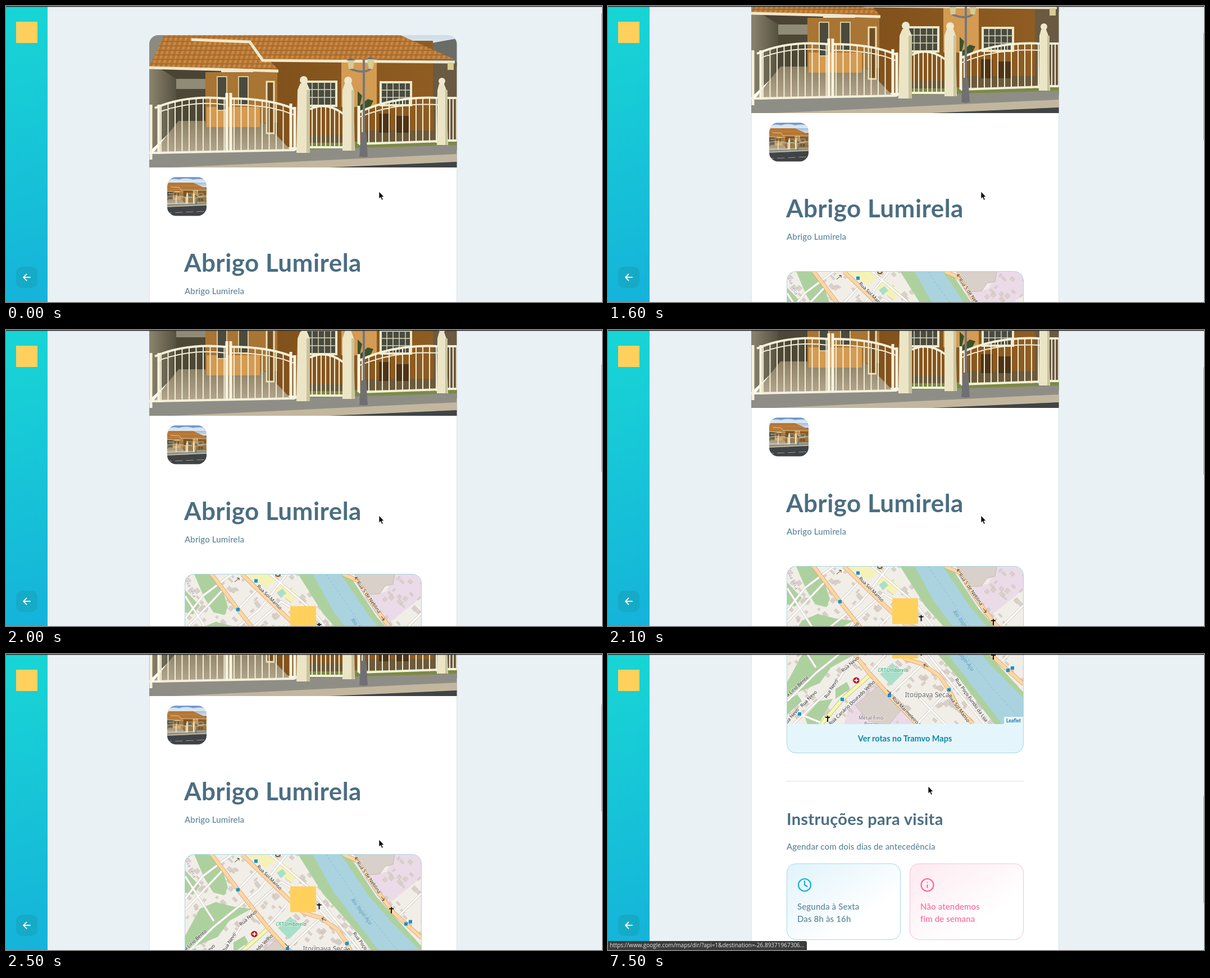
Write an HTML page that moves like this. It is 1061 by 528 pixels and loops after 8000 ms.

```html
<!DOCTYPE html>
<html lang="pt">
<head>
<meta charset="utf-8">
<style>
html, body { margin: 0; height: 100%; overflow: hidden; background: #e9f1f5 }
svg { display: block }
#stage { width: 1061px; height: 528px }
text { font: 500 15px Lato, sans-serif; fill: #5a8499; letter-spacing: .01em }
.title { font-size: 44px; font-weight: 700; fill: #4b6e82 }
.head { font-size: 29px; font-weight: 700; fill: #4b6e82 }
.link { font-size: 14.5px; font-weight: 700; fill: #1187a4; text-anchor: middle; letter-spacing: 0 }
.pink { fill: #ff669d }
#labels text { font: 8.5px "Noto Sans", sans-serif; fill: #222; text-anchor: middle; letter-spacing: 0;
  stroke: #fff; stroke-width: 1.6px; stroke-opacity: .7; paint-order: stroke }
#labels .area { font-size: 12px; fill: #666 }
#labels .faint { fill: #9a8b9c }
#labels .river { font-size: 9.5px; font-style: italic; fill: #6197bd; stroke: none }
#labels .park { font-style: italic; fill: #159a5c }
#labels .works { font-size: 9px; fill: #6f6272 }
.credit { font-size: 8.5px; font-weight: 700; fill: #0078a8; letter-spacing: 0 }
.address { font: 10px "Open Sans", sans-serif; fill: #e8e8e8; letter-spacing: 0 }
</style>
</head>
<body>
<svg id="stage" viewBox="0 0 1061 528">
  <defs>
    <linearGradient id="side" gradientUnits="userSpaceOnUse" x1="0" y1="0" x2="130" y2="520">
      <stop stop-color="#18d6d5"/><stop offset="1" stop-color="#15b2da"/>
    </linearGradient>
    <linearGradient id="sky" x2="0" y2="1"><stop stop-color="#5f8fcb"/><stop offset=".75" stop-color="#e4ebef"/></linearGradient>
    <linearGradient id="wall"><stop stop-color="#80501b"/><stop offset="1" stop-color="#8f5d22"/></linearGradient>
    <linearGradient id="garage"><stop stop-color="#8b846e"/><stop offset="1" stop-color="#565040"/></linearGradient>
    <linearGradient id="floor" x2="0" y2="1"><stop stop-color="#8d8064"/><stop offset="1" stop-color="#b3a78f"/></linearGradient>
    <linearGradient id="blueCard" x2="1" y2="1"><stop stop-color="#e0f3fb"/><stop offset=".7" stop-color="#fff"/></linearGradient>
    <linearGradient id="pinkCard" x2="1" y2="1"><stop stop-color="#fdeaf1"/><stop offset=".7" stop-color="#fff"/></linearGradient>
    <pattern id="tiles" width="9" height="8" patternUnits="userSpaceOnUse" patternTransform="skewX(-15)">
      <path fill="#b57431" d="M0 0h9v8H0z"/><path fill="#c78b46" d="M1 0h4v6H1z"/><path fill="#9a5f28" d="M0 7h9v1H0z"/>
    </pattern>
    <clipPath id="coverClip"><rect x="255" y="52" width="547.500" height="280" rx="16"/></clipPath>
    <clipPath id="avatarClip"><rect x="287" y="305" width="70" height="69.500" rx="16"/></clipPath>
    <clipPath id="mapClip"><rect x="318.500" y="321" width="421" height="272" rx="16"/></clipPath>

    <g id="house">
      <path fill="url(#sky)" d="M255-61h548V120H255z"/>
      <path fill="#eef2f4" d="M290-20q60-30 140-10 90-30 170 0 80-20 180 5v30H290z" opacity=".8"/>
      <path fill="#8c8b81" d="M255 52h40v60h-40z"/>
      <path fill="#6c6c67" d="M725 72l78-14v50h-78z"/>
      <path fill="url(#wall)" d="M440 62h320v190H440z"/>
      <path fill="#6a5a41" d="M760 100h43v155h-43z"/>
      <path fill="#4b4434" d="M255 112h128v105H255z"/>
      <path fill="url(#garage)" d="M255 112h20l28 18v85l-48 45z"/>
      <path fill="#8f8b77" d="M303 130h52v75h-52z"/>
      <path fill="#4d4736" d="M303 148h52v57h-52z"/>
      <path fill="url(#floor)" d="M262 262l45-57h150l50 52z"/>
      <path fill="#a97534" d="M355 118h128v90H355z"/>
      <path fill="#d49b52" d="M357 180h95v36h-95zM597 95h63v85h-63z"/>
      <path fill="#4a4a3d" stroke="#d9c79a" stroke-width="2" d="M376 126h17v60h-17zM414 126h17v50h-17z"/>
      <path fill="#6f4c22" stroke="#ece0b4" stroke-width="3" d="M464 135h13v92h-13z"/>
      <path fill="#474b42" stroke="#efe8c8" stroke-width="4" d="M534 135h54v43h-54zM667 136h54v41h-54z"/>
      <path fill="none" stroke="#ddd5b0" stroke-width="1.500" d="M545 135v43m11-43v43m11-43v43m11-43v43M534 149h54m-54 14h54M678 136v41m11-41v41m11-41v41m11-41v41M667 150h54m-54 13h54"/>
      <path fill="url(#tiles)" d="M255 108L282 52 310 5H600L702 52 798 95 457 96 436 63H330L440 66 484 113 255 108z"/>
      <path fill="url(#tiles)" d="M282 52h150l4 14 48 47-229-5z"/>
      <path fill="none" stroke="#f0e8cc" stroke-width="5" d="M330 60l104 4 23 33 342 3M255 110l230 6"/>
      <path fill="#7b8a45" d="M541 242h262v16H541z"/>
      <path fill="#6b5a3c" d="M541 230h60v14h-60zM640 222h130v20H640z"/>
      <path fill="#4d3419" d="M664 192h20v34h-20zM694 196h24v30h-24z"/>
      <path fill="#3d5227" d="M626 152l8 8-4 18 14-12 10 3-8 16h-20z"/>
      <path fill="#8f8e86" d="M255 264l548-16v40H255z"/>
      <path fill="#c2b79e" d="M255 290l548-26v14l-548 26z"/>
      <path fill="#404446" d="M255 302l548-24v131H255z"/>
      <path fill="none" stroke="#b9b9b0" stroke-width="5" stroke-dasharray="90 40" d="M255 372l548-24"/>
      <path id="bars" fill="none" stroke="#f3eed6" stroke-width="2"/>
      <path fill="none" stroke="#f5f0da" stroke-width="4" d="M265 182Q320 158 391 165M401 165Q470 165 514 184M541 184Q570 170 600 192M628 190Q690 160 769 164M786 164h17M262 262l252-5M541 252h59M628 246l141-5M786 240h17"/>
      <path fill="none" stroke="#f7f3de" stroke-width="5" d="M258 176v98M272 176v88M393 155v105M400 155v105M507 174v84M514 180v78M628 178v68"/>
      <path fill="#ebe5c6" d="M519 150l5-12h12l5 12v112h-24zM599 150l4-12h12l4 12 2 108h-22zM768 150l3-11h9l4 11 3 98h-20z"/>
      <path fill="#c9c3a0" d="M535 150h6v112h-6zM615 150h5v108h-5zM782 150h4v98h-4z"/>
      <g fill="#eee8cc"><circle cx="530" cy="132" r="7"/><circle cx="609" cy="133" r="7"/><circle cx="776" cy="134" r="6"/></g>
      <path fill="none" stroke="#77777a" stroke-width="4" d="M637 95v175M613 112q24 10 36 0"/>
      <path fill="#707073" d="M632 225h9l3 44h-15zM606 97l8-5 8 5zM641 95l8-5 9 5z"/>
      <path fill="#d6cc94" d="M608 97h12l-2 15h-8zM643 95h13l-3 17h-7zM786 101h11v13h-11z"/>
    </g>
  </defs>

  <path fill="#e9f1f5" d="M0 0h1061v528H0z"/>
  <g id="page">
    <rect x="255.500" y="52.500" width="547" height="1300" rx="16" fill="#fff" stroke="#d9e5ea"/>
    <g clip-path="url(#coverClip)"><svg x="255" y="52" width="548" height="236" viewBox="255 52 548 236"><use href="#house"/></svg></g>
    <g clip-path="url(#avatarClip)"><svg x="287" y="305" width="70" height="70" viewBox="290 -61 472 470"><use href="#house"/></svg></g>
    <text class="title" x="317" y="474">Abrigo Lumirela</text>
    <text x="318" y="514">Abrigo Lumirela</text>

    <g transform="translate(0 249.5)">
      <g clip-path="url(#mapClip)">
        <path fill="#f1eee8" d="M318 321h422v272H318z"/>
        <path fill="#ebdbe8" d="M692 321h48v41l-65 52-38-52 40-10zM432 500l45-35 80 76H420z"/>
        <path id="buildings" fill="#d9d0c9" stroke="#c7b9ae" stroke-width=".5"/>
        <path fill="#d9d0c9" stroke="#c7b9ae" d="M620 321h72l-3 18-14 3-10 14-25 2zM440 507l46-37 42 38-27 33h-32z"/>
        <path fill="#add19e" d="M335 321h27l24 30 9 28-6 15-20-5-16-26zM319 350l26 27-12 16-14-4zM319 466l26-48 28-12 32 8 32 4-40 22-20 28-58 24zM405 478l20-12 6 12-26 18zM350 528l26-28 24-4-25 45h-20zM319 500l18-12 8 12-26 24z"/>
        <path fill="#f5f2b8" d="M425 321h45l10 12-18 12zM478 350l16-13 28 22-14 12z"/>
        <path fill="#a9dfca" d="M482 354l10-7 7 8-10 8zM484 452l22-20 20 18-22 22z"/>
        <path fill="#add19e" d="M520 321h90l50 76 80 88v56h-52l-62-80-62-70z"/>
        <path fill="#aad3df" d="M546 321h50l50 74 40 46 54 54v46h-38l-72-92-48-63z"/>
        <path fill="none" stroke="#86b2cc" stroke-dasharray="4 3" stroke-width=".7" d="M570 321l60 88 60 75 50 52"/>
        <g id="roads" fill="none" stroke-linejoin="round"></g>
        <path id="stops" fill="#1292d4"/>
        <path stroke="#111" stroke-width="2" d="M557.500 408v11m-4-8h8M686 415v11m-4-8h8M391 526v11m-4-8h8"/>
        <circle cx="442" cy="463" r="5.500" fill="#bf0016"/><path stroke="#fff" stroke-width="1.800" d="M442 459.500v7m-3.500-3.500h7"/>
        <path id="arrows" fill="none" stroke="#4c3b22"/>
        <circle cx="484" cy="321" r="4" fill="none" stroke="#734a08" stroke-width="2"/>
        <g id="labels"></g>
        <path fill="#ffd15c" d="M506 378h46v46h-46z"/>
        <path fill="#fff" fill-opacity=".75" d="M705 528h35v13h-35z"/>
        <text class="credit" x="709" y="538">Leaflet</text>
        <path fill="#e4f6fb" d="M318 541h422v52H318z"/>
      </g>
      <rect x="318.500" y="321" width="421" height="271.500" rx="16" fill="none" stroke="#a5d7e3"/>
      <text class="link" x="528.500" y="571.500">Ver rotas no Tramvo Maps</text>
    </g>

    <g transform="translate(0 665.5)">
      <path fill="#d3e4e9" d="M318 226.500h422v1H318z"/>
      <text class="head" x="318" y="305">Instruções para visita</text>
      <text x="318" y="348.500">Agendar com dois dias de antecedência</text>
      <rect x="318.500" y="374" width="202" height="135.500" rx="16" fill="url(#blueCard)" stroke="#a3d9e6"/>
      <rect x="537.500" y="374" width="202" height="135.500" rx="16" fill="url(#pinkCard)" stroke="#f6bfd2"/>
      <g fill="none" stroke-width="2.200" stroke-linecap="round" stroke-linejoin="round">
        <g stroke="#17b1cf"><circle cx="350" cy="412" r="11"/><path d="M350 405v7l4.500 2.500"/></g>
        <g stroke="#ff669d"><circle cx="568.500" cy="412" r="11"/><path d="M568.500 412v4.500m0-9v.1"/></g>
      </g>
      <text x="337" y="456">Segunda à Sexta</text><text x="337" y="478">Das 8h às 16h</text>
      <text class="pink" x="556" y="456">Não atendemos</text><text class="pink" x="556" y="478">fim de semana</text>
    </g>
  </g>

  <path fill="url(#side)" d="M0 0h74v528H0z"/>
  <path fill="#ffd15c" d="M18 28h38v38H18z"/>
  <rect x="18" y="465" width="38" height="38" rx="11" fill="#15abc7"/>
  <path fill="none" stroke="#fff" stroke-width="1.800" stroke-linecap="round" stroke-linejoin="round" d="M43 484H31m5.500-5.500L31 484l5.500 5.500"/>
  <rect id="thumb" x="1060" width="1" height="191" fill="#aaa39d"/>
  <path fill="#2c2c2c" d="M0 0h1061v1.500H0z"/>
  <g id="status">
    <path fill="#3b3b3b" d="M0 512h351q3 0 3 3v13H0z"/>
    <text class="address" x="3" y="523">https://www.google.com/maps/dir/?api=1&amp;destination=-26.89371967306…</text>
  </g>
  <path id="cursor" fill="#000" stroke="#fff" stroke-width=".8" d="M0 0v13l2.900-2.700 2.200 5 2.200-1-2.200-4.700h3.900z"/>
</svg>
<script>
const $ = id => document.getElementById(id);

// Gate bars hang below an arch given by its end heights and bulge.
const bars = (x0, x1, gap, y0, y1, bulge, bottom) => {
  let d = '';
  for (let x = x0; x < x1; x += gap) {
    const u = (x - x0) / (x1 - x0);
    d += `M${x} ${y0 + (y1 - y0) * u - 4 * bulge * u * (1 - u)}V${bottom}`;
  }
  return d;
};
$('bars').setAttribute('d',
  bars(276, 391, 12.5, 178, 165, 6, 261) + bars(406, 506, 12.5, 165, 182, 6, 258) +
  bars(545, 600, 8, 183, 192, 10, 252) + bars(634, 769, 12, 188, 164, 10, 244) +
  bars(790, 803, 6, 164, 164, 0, 240) + 'M270 190Q330 168 390 176M402 176Q470 176 512 194M630 198Q690 172 769 176');

let seed = 7;
const random = () => (seed = seed * 16807 % 2147483647) / 2147483647;
let blocks = '';
for (let i = 0; i < 330; i++) {
  const w = 2 + random() * 5, h = 2 + random() * 4;
  blocks += `M${319 + random() * 421} ${321 + random() * 220}l${w} ${w} ${h} ${-h} ${-w} ${-w}z`;
}
$('buildings').setAttribute('d', blocks);

const road = (d, fill, edge, width) => {
  $('roads').innerHTML += `<path d="${d}" stroke="${edge}" stroke-width="${width + 1.5}"/><path d="${d}" stroke="${fill}" stroke-width="${width}"/>`;
};
road('M319 400L350 360 402 321M385 350L319 420M440 415L405 470 330 541M319 500L370 450 450 385 500 321' +
  'M413 384L450 345M440 415L490 370 540 400 590 455M465 450L500 410M470 321L545 385 580 430 670 541' +
  'M501 490L560 434M550 541L607 480M550 490L600 541M700 430L740 390M319 360L370 440M341 523L385 541',
  '#fff', '#cdc7bf', 3);
road('M470 450L417 497 380 541', '#f4f8b4', '#b5b878', 6);
road('M366 321L413 384 465 450 501 490 550 541M420 321L500 398 530 425 560 434 590 455 607 480 625 515 650 541' +
  'M600 321L625 332 660 385 690 425 740 470', '#fcd6a4', '#d9a05f', 6);

$('stops').setAttribute('d', [[445, 333], [413, 384], [417, 497], [501, 490], [607, 480], [712, 445], [720, 441], [341, 523]]
  .map(([x, y]) => `M${x - 3} ${y - 3}h6v6h-6z`).join(''));
$('arrows').setAttribute('d', 'M407 335l8-7m-4 0h4v4M570 439l-8-4m2 4l-2-4 4-1M628 333l-6-6m0 4v-4h4M497 480l6 7m0-4v4h-4M668 396l5 7m0-4v4h-4');

const labels = [
  [328, 344, 65, 'pava Seca', 'faint'],
  [469, 362, 45, 'Rua Sol Manso'], [625, 513, 54, 'Rua Sol Manso'],
  [646, 362, 55, 'Rua 5 de Neblina'],
  [431, 434, -41, 'Rua Nevo'], [397, 478, -58, 'Rua Nevo'], [357, 496, -45, 'Rua Nevo'], [326, 528, -50, 'Rua Nevo'],
  [333, 477, -42, 'Rua Lírio Bento'],
  [434, 503, -44, 'Rua Canário Dourado Velho'],
  [532, 519, 46, 'Rua Marmeleiro V'],
  [647, 498, 54, 'Rua Poço Fundo da Lua'],
  [633, 423, 53, 'Rio Itajaí-Açu', 'river'],
  [507, 445, 0, 'CRT Umbarela', 'park'],
  [568, 490, 0, 'Itoupava Seca', 'area'],
  [468, 530, 0, 'Metal Fino', 'works'], [468, 541, 0, 'Brisol', 'works']
];
$('labels').innerHTML = labels.map(([x, y, angle, text, kind = '']) =>
  `<text class="${kind}" transform="translate(${x} ${y})rotate(${angle})" y="3">${text}</text>`).join('');

// [time in ms, scroll offset]
const steps = [[0, 0], [100, 28], [600, 83], [1600, 97], [1700, 111.5], [1800, 123], [2000, 135], [2100, 149],
  [2200, 163], [2300, 177], [2400, 195], [2500, 213], [2700, 232], [2800, 249.5], [7500, 665.5]];

function draw() {
  const time = performance.now() % 8000;
  const scroll = steps.findLast(step => step[0] <= time)[1];
  const atEnd = time >= 7500;
  $('page').setAttribute('transform', `translate(0 ${-scroll})`);
  $('thumb').setAttribute('y', 13 + scroll * .361);
  $('cursor').setAttribute('transform', atEnd ? 'translate(570 236)' : 'translate(664 331)');
  $('status').setAttribute('visibility', atEnd ? 'visible' : 'hidden');
  requestAnimationFrame(draw);
}
draw();
</script>
</body>
</html>
```
